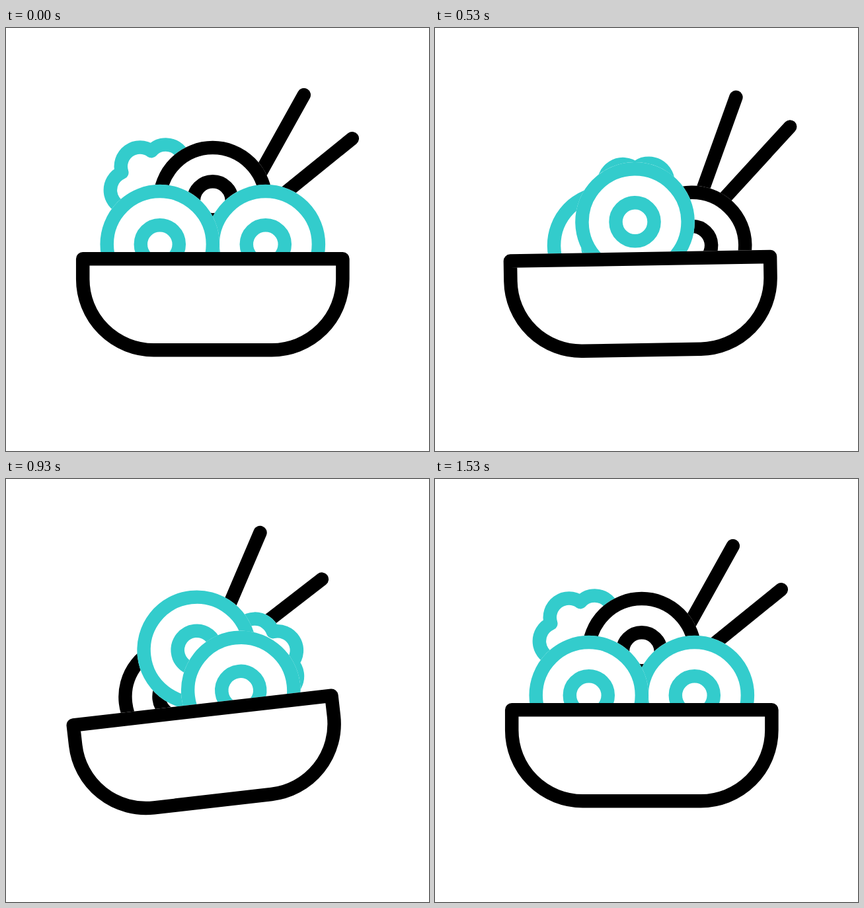
Animation of 640 by 640 pixels, one loop 2000 ms. Source, as an HTML page:

```html
<!DOCTYPE html>
<html lang="en">
<head>
<meta charset="utf-8">
<title>Noodle bowl</title>
<style>
  html, body { margin: 0; width: 100%; height: 100%; overflow: hidden; background: #fff; }
  svg { display: block; width: 100%; height: 100%; }
</style>
</head>
<body>
<svg id="stage" viewBox="0 0 640 640"></svg>
<script>
const TEAL = '#33cccc', BLACK = '#000';
const LOOP = 2000, FPS = 30, END = 44;
const BEATS = [0, 10, 16, 23, 34, END];
const stage = document.getElementById('stage');

function add(parent, tag, attrs = {}) {
  const el = document.createElementNS('http://www.w3.org/2000/svg', tag);
  for (const k in attrs) el.setAttribute(k, attrs[k]);
  return parent.appendChild(el);
}

function segment(times, f) {
  let i = 0;
  while (i < times.length - 2 && f > times[i + 1]) i++;
  const h = times[i + 1] - times[i];
  return { i, h, u: Math.min(1, (f - times[i]) / h) };
}

const smooth = u => u * u * (3 - 2 * u);

// Smooth path that leaves rest gently, meets one point per beat and settles at rest again.
function path(rest, ...points) {
  const p = [rest, ...points, rest], last = p.length - 1;
  const slope = (i, c) => (p[i + 1][c] - p[i][c]) / (BEATS[i + 1] - BEATS[i]);
  const speed = (i, c) => {
    if (i === 0 || i === last) return 0;
    const before = BEATS[i] - BEATS[i - 1], after = BEATS[i + 1] - BEATS[i];
    return (slope(i - 1, c) * after + slope(i, c) * before) / (before + after);
  };
  return f => {
    const { i, h, u } = segment(BEATS, f), v = 1 - u;
    return [0, 1].map(c => p[i][c] + (p[i + 1][c] - p[i][c]) * smooth(u)
      + h * u * v * (v * speed(i, c) - u * speed(i + 1, c)));
  };
}

// The bowl rocks about the middle of its base; its contents live in the same frame.
const rockTimes = [0, 9, 21, 33, END], rockAngles = [0, -15, 7.5, -15, 0];
function rock(f) {
  const { i, u } = segment(rockTimes, f);
  return rockAngles[i] + (rockAngles[i + 1] - rockAngles[i]) * smooth(u);
}

const group = add(stage, 'g', {
  fill: 'none', 'stroke-linecap': 'round', 'stroke-linejoin': 'round', 'stroke-width': 20.5
});
const movers = [];

function outline(parent, d, color) {
  add(parent, 'path', { d, fill: '#fff', stroke: '#fff' });
  add(parent, 'path', { d, stroke: color });
}

function sticks(foot, ...tips) {
  for (const tip of tips) {
    const el = add(group, 'path', { stroke: BLACK });
    movers.push(f => el.setAttribute('d', `M${foot(f)}L${tip(f)}`));
  }
}

function lettuce(route) {
  const el = add(group, 'g');
  let d = '';
  for (let i = 0; i <= 6; i++) {
    const a = i * Math.PI / 3;
    d += (i ? 'A29 29 0 0 1 ' : 'M') + 55.3 * Math.cos(a) + ' ' + 55.3 * Math.sin(a);
  }
  outline(el, d + 'Z', TEAL);
  movers.push(f => {
    const turn = 24 + 120 * Math.sin(Math.PI / 2 * Math.min(1, f / END));
    el.setAttribute('transform', `translate(${route(f)}) rotate(${turn})`);
  });
}

function ball(color, route) {
  const el = add(group, 'g');
  add(el, 'circle', { r: 90.3, fill: '#fff' });
  for (const r of [80.1, 29]) add(el, 'circle', { r, stroke: color });
  movers.push(f => el.setAttribute('transform', `translate(${route(f)})`));
}

sticks(
  path([11, -158], [91, -168], [66, -161], [-4, -170], [30, -214]),
  path([138, -386], [151, -392], [149, -380], [117, -357], [129, -444]),
  path([211, -320], [225, -362], [230, -334], [192, -283], [225, -365]));
lettuce(path([-87, -246], [-47, -230], [-4, -219], [90, -206], [38, -200]));
ball(BLACK, path([0, -226], [68, -188], [79, -157], [-2, -152], [-45, -184]));
ball(TEAL, path([80, -160], [-7, -148], [-50, -159], [-28, -217], [41, -220]));
ball(TEAL, path([-80, -160], [-41, -191], [-7, -194], [59, -174], [28, -152]));
outline(group, 'M-196.6-138H196.6V-107.2A107.2 107.2 0 0 1 89.4 0H-89.4A107.2 107.2 0 0 1-196.6-107.2Z', BLACK);

function render(ms) {
  // whole steps, whose start times are rounded to 10 ms
  const f = Math.min(END, Math.floor((ms % LOOP + 3.4) * FPS / 1000));
  group.setAttribute('transform', `translate(312.8 487.2) rotate(${rock(f)})`);
  movers.forEach(move => move(f));
}

const start = performance.now();
function tick() {
  render(performance.now() - start);
  requestAnimationFrame(tick);
}
render(0);
requestAnimationFrame(tick);
</script>
</body>
</html>
```
